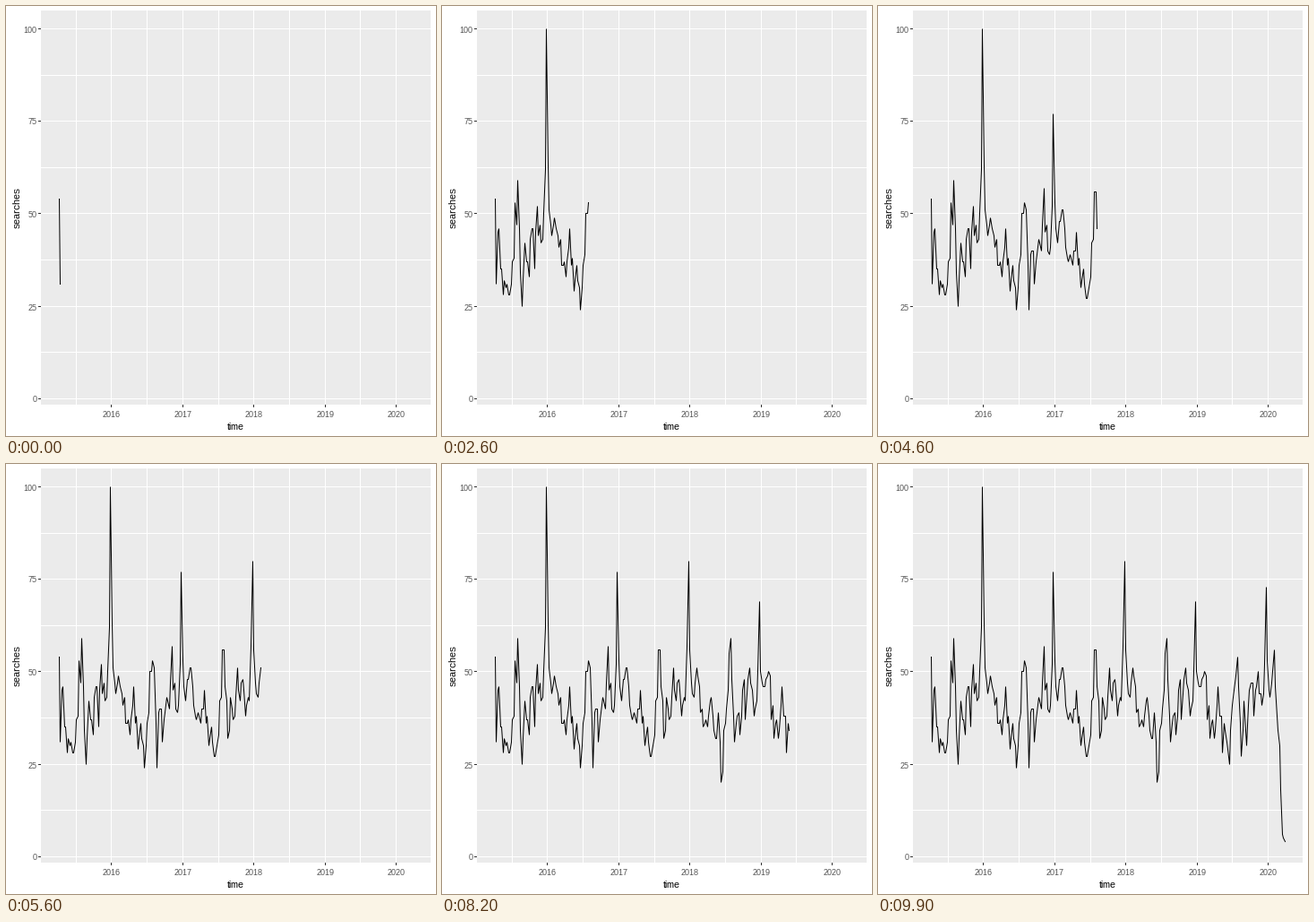
A matplotlib script for the animation above (10 s loop, 480 px wide and 480 px high).

```python
import numpy as np
import matplotlib.pyplot as plt
from matplotlib.animation import FuncAnimation
from matplotlib.patches import Rectangle

plt.rcParams.update({
    "font.family": "Liberation Sans",
    "text.hinting": "native",
    "text.hinting_factor": 1,
    "path.simplify": False,
})

SIZE, DPI = 480, 72
FRAMES, INTERVAL = 100, 100
WEEKS, YEAR = 260, 52
LEFT, TOP, RIGHT, BOTTOM = 39, 5, 474, 445

# Typical year, starting in April: (week, searches)
SEASON = [(0, 35), (3, 44), (6, 30), (8, 34), (11, 24), (15, 47), (17, 56),
          (20, 27), (22, 41), (24, 33), (27, 48), (29, 40), (31, 51), (35, 37),
          (41, 41), (44, 51), (48, 38), (52, 35)]
PEAK_WEEK = 38
PEAKS = [100, 77, 80, 69, 73]
COLLAPSE = [(253, 46), (254, 38), (256, 30), (258, 6), (260, 4)]


def build_series():
    rng = np.random.default_rng(4)
    weeks = np.arange(WEEKS + 1)
    values = np.interp(weeks % YEAR, *zip(*SEASON))
    values += rng.normal(0, 2.5, weeks.size)
    for year, peak in enumerate(PEAKS):
        away = np.abs(weeks - PEAK_WEEK - year * YEAR)
        spike = 0.4 ** away * (away < 6)
        values += (peak - values) * spike
    values[:2] = 54, 31
    start = COLLAPSE[0][0]
    values[start:] = np.interp(weeks[start:], *zip(*COLLAPSE))
    return weeks, np.round(values)


def px(week):
    return 58.55 + week * (RIGHT - LEFT) / 1.1 / WEEKS


def py(value):
    return 25.3 + (100 - value) * (BOTTOM - TOP) / 1.1 / 97


def snap(v):
    """Centre of the nearest pixel."""
    return np.floor(v + 0.5) + 0.5


def year_x(year):
    days = (np.datetime64(f"{year}-01-01") - np.datetime64("2015-04-05")).astype(int)
    return px(days / 7)


fig = plt.figure(figsize=(SIZE / DPI, SIZE / DPI), dpi=DPI, facecolor="white")
ax = fig.add_axes([0, 0, 1, 1])
ax.set_xlim(0, SIZE)
ax.set_ylim(SIZE, 0)
ax.axis("off")
ax.add_patch(Rectangle((LEFT, TOP), RIGHT - LEFT, BOTTOM - TOP,
                       facecolor="#EBEBEB", linewidth=0))


def rule(xs, ys, color="white"):
    ax.plot(xs, ys, color=color, lw=1, snap=False, solid_capstyle="butt")


def label(x, y, text, size=9, color="#4D4D4D", ha="center", va="baseline", **kw):
    ax.text(x, y, text, fontsize=size, color=color, ha=ha, va=va, **kw)


for value in np.arange(0, 101, 12.5):
    y = snap(py(value))
    rule([LEFT, RIGHT], [y, y])
    if value % 25 == 0:
        rule([LEFT - 3, LEFT], [y, y], "#333333")
        label(34.5, y + 4, f"{value:.0f}", ha="right")

for year in range(2016, 2021):
    x = snap(year_x(year))
    mid = snap((year_x(year) + year_x(year - 1)) / 2)
    rule([x, x], [TOP, BOTTOM])
    rule([mid, mid], [TOP, BOTTOM])
    rule([x, x], [BOTTOM, BOTTOM + 3], "#333333")
    label(x, 459, str(year))

label(256, 473, "time", 11, "black")
label(17.5, 225.5, "searches", 11, "black", rotation=90, ha="right", va="center")

weeks, values = build_series()
xs, ys = snap(px(weeks)), snap(py(values))
line, = ax.plot([], [], color="black", lw=1, snap=False,
                solid_joinstyle="bevel", solid_capstyle="projecting")


def update(frame):
    last = min(WEEKS, int((frame + 0.5) * WEEKS / (FRAMES - 1)))
    line.set_data(xs[:last + 1], ys[:last + 1])
    return line,


anim = FuncAnimation(fig, update, frames=FRAMES, interval=INTERVAL,
                     repeat=True, repeat_delay=0, blit=False)
plt.show()
```
